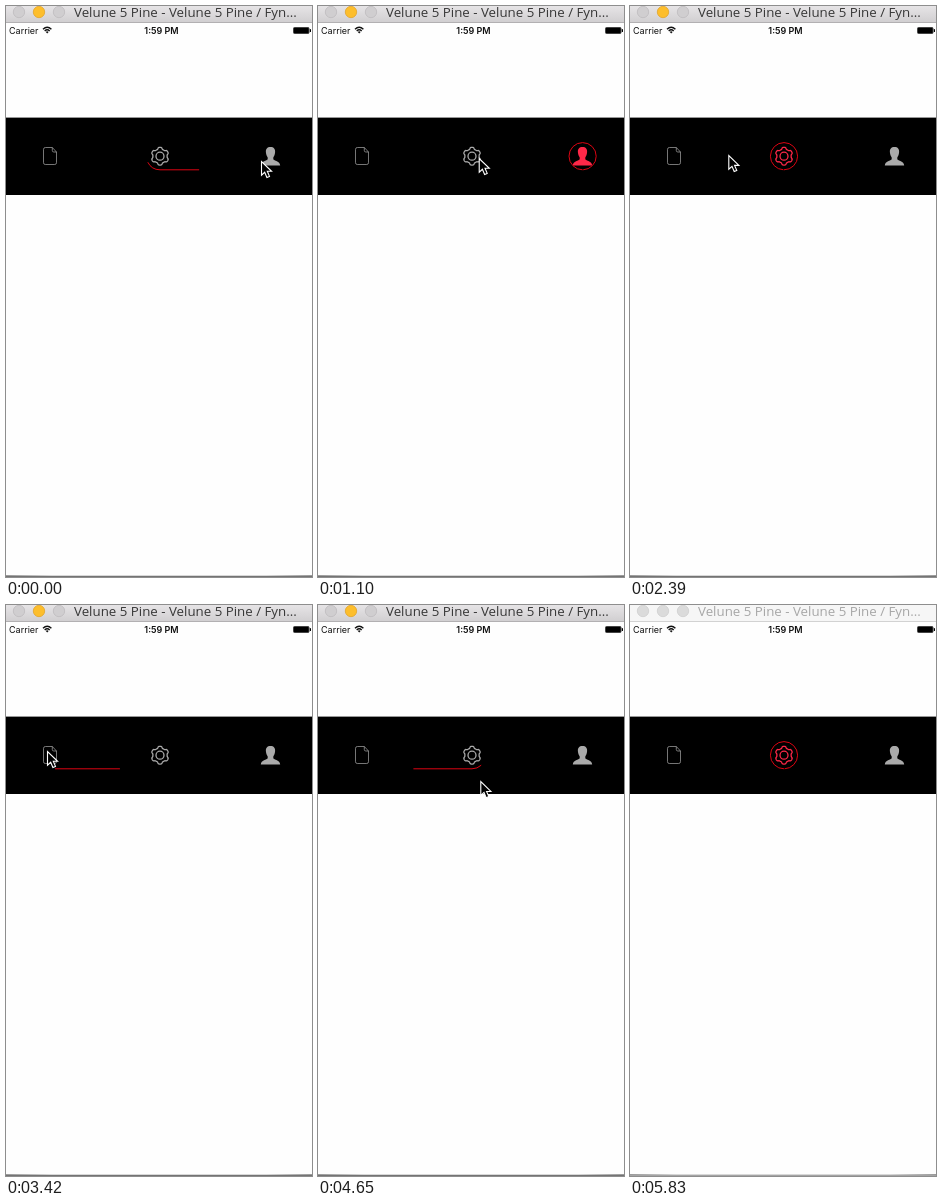
An HTML page that plays this animation: 306x571 px, repeating every 5850 ms.

```html
<!DOCTYPE html>
<html lang="en">
<head>
<meta charset="utf-8">
<title>Tab bar</title>
<style>
  html, body { margin: 0; width: 100%; height: 100%; overflow: hidden; background: #fff; }
  svg { display: block; width: 306px; height: 571px; }
  .title { font: 13.3px "Open Sans", sans-serif; fill: #363636; }
  .status { font: 9px Inter, sans-serif; fill: #111; }
  .clock { font-weight: 600; text-anchor: middle; }
  .lights circle { fill: #d0ced0; stroke: #bebcbe; stroke-width: .8; }
  .lights .mid { fill: #fdbe2c; stroke: #e3a52a; }
  .edge { fill: #b2b0b2; }
  .base { fill: #747474; }
  .idle .bar { fill: #f6f6f6; }
  .idle .edge { fill: #d2d2d2; }
  .idle .base { fill: #a4a4a4; }
  .idle .title { fill: #a6a6a6; }
  .idle .lights circle { fill: #dbdbdb; stroke: #cfcfcf; }
  .line { fill: none; stroke: currentColor; stroke-width: 1.3; }
  .thin { stroke-width: .7; }
</style>
</head>
<body>
<svg id="stage" viewBox="0 0 306 571">
  <defs>
    <linearGradient id="chrome" x2="0" y2="1">
      <stop stop-color="#e6e4e6"/><stop offset="1" stop-color="#d1cfd1"/>
    </linearGradient>
    <linearGradient id="shade">
      <stop stop-color="#999"/><stop offset=".15" stop-color="#d8d8d8"/>
      <stop offset=".85" stop-color="#d8d8d8"/><stop offset="1" stop-color="#999"/>
    </linearGradient>
  </defs>
  <rect width="306" height="571" fill="#fefefe"/>
  <rect class="bar" width="306" height="16" fill="url(#chrome)"/>
  <rect class="edge" y="16" width="306" height="1"/>
  <g class="lights">
    <circle cx="13" cy="6" r="5.7"/><circle class="mid" cx="33" cy="6" r="5.7"/><circle cx="53" cy="6" r="5.7"/>
  </g>
  <text class="title" x="68" y="11">Velune 5 Pine - Velune 5 Pine / Fyn...</text>

  <text class="status" x="3" y="28">Carrier</text>
  <g fill="none" stroke="#111" stroke-width="1.4">
    <path d="M37 23.2Q41.2 19.2 45.4 23.2M38.7 25Q41.2 22.6 43.7 25"/>
    <path d="M39.8 25.9L41.2 27.6L42.6 25.9Q41.2 24.8 39.8 25.9Z" fill="#111" stroke="none"/>
  </g>
  <text class="status clock" x="155.5" y="28">1:59 PM</text>
  <rect x="287.5" y="21.5" width="15.5" height="6" rx="1" stroke="#444"/>
  <rect x="303.8" y="23" width="1.2" height="3" rx=".6"/>

  <rect y="111.6" width="306" height="77.4"/>
  <g class="icon">
    <path class="line thin" d="M39.5 141.5H46.3L50.5 146V156.7Q50.5 158.5 48.7 158.5H39.3Q37.5 158.5 37.5 156.7V143.3Q37.5 141.5 39.5 141.5M46.3 141.5V144.5Q46.3 146 47.8 146H50.5"/>
  </g>
  <g class="icon">
    <path id="gear" class="line"/>
    <circle class="line" cx="154" cy="150.2" r="4"/>
  </g>
  <g class="icon">
    <path fill="currentColor" d="M264.5 141C267.8 141 269.4 143 269.1 146.2C268.9 149 267.9 150.2 267.3 151.6V153.2C268 154.8 273.9 154.8 274.2 159.4H254.8C255.1 154.8 261 154.8 261.7 153.2V151.6C261.1 150.2 260.1 149 259.9 146.2C259.6 143 261.2 141 264.5 141Z"/>
  </g>
  <path id="trail" fill="none" stroke="#dc0412"/>

  <rect y="569" width="306" height="1" fill="url(#shade)"/>
  <rect class="base" y="570" width="306" height="1"/>
  <path id="cursor" d="M.5 .5V14.2L3.7 11.3L5.9 16.5L8.5 15.4L6.3 10.3H10.6Z" stroke="#fff" stroke-width="1.1"/>
</svg>
<script>
const LOOP = 5850, MOVE = 690, FADE = 50;
const tabX = [44, 154, 264.6], midY = 150.2, R = 13.6, ring = 2 * Math.PI * R;
const GRAY = [170, 170, 170], RED = [255, 40, 72];

const moves = [
  { at: -245, tab: 2 }, { at: 1445, tab: 1 }, { at: 2980, tab: 0 }, { at: 4170, tab: 1 }
];

const home = { x: 255, y: 155 };
const glides = [
  { from: 700, to: 1210, x: 142, y: 151.4 },
  { from: 2110, to: 2740, x: 41, y: 146 },
  { from: 3580, to: 3880, x: 154, y: 155 },
  { from: 4560, to: 4650, x: 162, y: 175 },
  { from: 4650, to: 4820, x: 259, y: 559 },
  { from: 5230, to: 5370, x: 266, y: 575 }
];

const byId = id => document.getElementById(id);
const stage = byId("stage"), trail = byId("trail"), cursor = byId("cursor");
const icons = document.querySelectorAll(".icon");
const clamp = v => Math.min(1, Math.max(0, v));
const mix = (a, b, k) => a + (b - a) * k;
const ease = u => (u + u * u * (3 - 2 * u)) / 2;

function gearPath() {
  const points = Array.from({ length: 120 }, (_, i) => {
    const a = i / 60 * Math.PI;
    const r = 8 + .9 * Math.tanh(2 * Math.cos(6 * a));
    return `${154 + r * Math.sin(a)} ${midY - r * Math.cos(a)}`;
  });
  return "M" + points.join("L") + "Z";
}

// Full ring, leaving and returning at its lowest point
function ringPath(x, sweep) {
  const arc = y => `A${R} ${R} 0 0 ${sweep} ${x} ${y}`;
  return `L${x} ${midY + R}` + arc(midY - R) + arc(midY + R);
}

function drawTabs(t) {
  const n = moves.findLastIndex(m => m.at <= t);
  const { at, tab } = moves[n];
  const a = tabX[moves.at(n - 1).tab], b = tabX[tab], sweep = b > a ? 0 : 1;
  const k = clamp((t - at) / MOVE);
  const travel = ring + Math.abs(b - a);
  const tail = travel * k;
  const head = ring + travel * k * k * (1.85 - .85 * k);
  trail.setAttribute("d", `M${a} ${midY + R}` + ringPath(a, sweep) + ringPath(b, sweep));
  trail.setAttribute("stroke-dasharray", `${head - tail} 999`);
  trail.setAttribute("stroke-dashoffset", -tail);

  const lit = clamp((t - at - MOVE) / FADE);
  icons.forEach((icon, i) => {
    const rgb = GRAY.map((c, j) => Math.round(mix(c, RED[j], i === tab ? lit : 0)));
    icon.style.color = `rgb(${rgb})`;
  });
}

function drawCursor(t) {
  let { x, y } = home;
  for (const g of glides) {
    const k = ease(clamp((t - g.from) / (g.to - g.from)));
    x = mix(x, g.x, k);
    y = mix(y, g.y, k);
  }
  cursor.setAttribute("transform", `translate(${x} ${y})`);
}

function frame(now) {
  const t = now % LOOP;
  drawTabs(t);
  drawCursor(t);
  stage.classList.toggle("idle", t >= 5830);
  requestAnimationFrame(frame);
}

byId("gear").setAttribute("d", gearPath());
frame(0);
</script>
</body>
</html>
```
